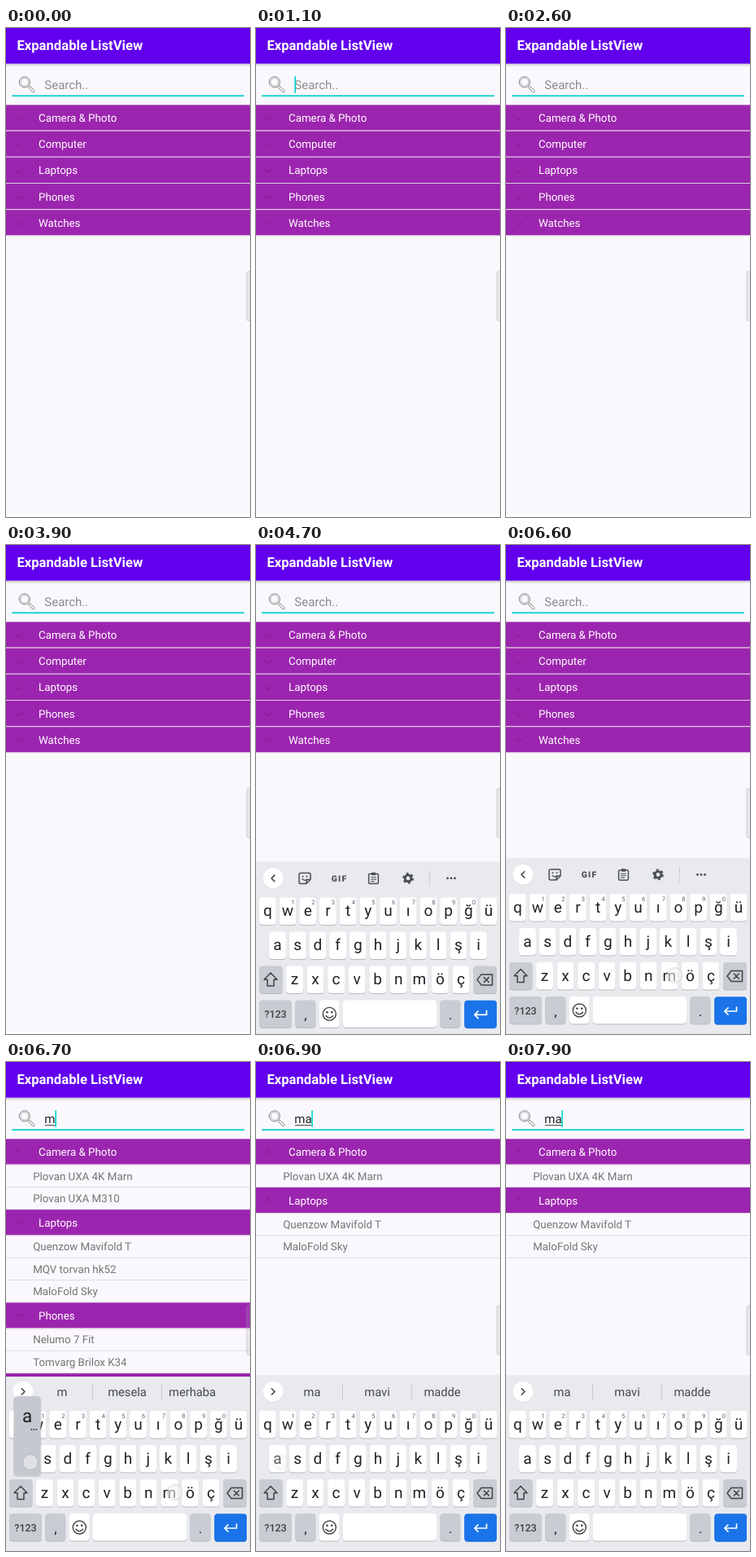
Write an HTML page that moves like this. It is 300 px wide and 600 px high and loops after 8 s.

```html
<!DOCTYPE html>
<html lang="en">
<head>
<meta charset="utf-8">
<title>Expandable list search</title>
<style>
html, body { margin: 0; width: 100%; height: 100%; overflow: hidden; background: #faf8fc; }
svg { display: block; width: 100%; height: 100%; font-family: Roboto, "Noto Sans", sans-serif; }
text { text-rendering: geometricPrecision; }
</style>
</head>
<body>
<svg id="stage" viewBox="0 0 300 600" xmlns="http://www.w3.org/2000/svg">
  <defs>
    <linearGradient id="shade" x2="0" y2="1">
      <stop offset="0" stop-color="#000" stop-opacity=".22"/>
      <stop offset="1" stop-color="#000" stop-opacity="0"/>
    </linearGradient>
  </defs>
</svg>
<script>
const LOOP = 8000, STEP = 100;
const LIST_TOP = 94.4, GROUP_H = 32.2, CHILD_H = 27.3;
const KEYS_TOP = 386, KEYS_H = 214;
const INK = '#202124', ICON = '#4b4e53';

const stage = document.getElementById('stage');

function add(parent, tag, attrs = {}, content) {
  const node = document.createElementNS('http://www.w3.org/2000/svg', tag);
  for (const name in attrs) node.setAttribute(name, attrs[name]);
  if (content !== undefined) node.textContent = content;
  parent.appendChild(node);
  return node;
}
const group = (parent = stage) => add(parent, 'g');
const rect = (p, x, y, width, height, fill, rx = 0) =>
  add(p, 'rect', { x, y, width, height, fill, rx });
const label = (p, x, y, size, fill, text, more = {}) =>
  add(p, 'text', { x, y, 'font-size': size, fill, ...more }, text);
const centred = (p, x, y, size, fill, text, more = {}) =>
  label(p, x, y, size, fill, text, { 'text-anchor': 'middle', ...more });
const line = (p, d, stroke = ICON, width = 1.4) =>
  add(p, 'path', { d, stroke, fill: 'none', 'stroke-width': width,
    'stroke-linecap': 'round', 'stroke-linejoin': 'round' });
const disc = (p, cx, cy, r, fill, more = {}) =>
  add(p, 'circle', { cx, cy, r, fill, ...more });
const ring = (p, cx, cy, r, stroke = ICON, width = 1.4, more = {}) =>
  disc(p, cx, cy, r, 'none', { stroke, 'stroke-width': width, ...more });
const show = (node, on) => node.setAttribute('display', on ? 'inline' : 'none');

// Catalogue
const catalogue = [
  { name: 'Camera & Photo', items: ['Plovan UXA 4K Marn', 'Plovan UXA M310'] },
  { name: 'Computer', items: [] },
  { name: 'Laptops', items: ['Quenzow Mavifold T', 'MQV torvan hk52', 'MaloFold Sky'] },
  { name: 'Phones', items: ['Nelumo 7 Fit', 'Tomvarg Brilox K34'] },
  { name: 'Watches', items: ['Dromvi 3'] }
];

function filterBy(query) {
  if (!query) return catalogue.map(({ name }) => ({ name, items: [] }));
  return catalogue
    .map(({ name, items }) => ({ name, items: items.filter(i => i.toLowerCase().includes(query)) }))
    .filter(({ items }) => items.length);
}

function buildList(query) {
  const g = group();
  let y = LIST_TOP;
  for (const { name, items } of filterBy(query)) {
    rect(g, 0, y, 300, GROUP_H - 1, '#9c25af');
    rect(g, 0, y + GROUP_H - 1, 300, 1, '#dccbe0');
    line(g, items.length ? `M11 ${y + 17.6}l4.5 -4.2l4.5 4.2` : `M11 ${y + 14.6}l4.5 4.2l4.5 -4.2`,
      '#771b89', 1);
    label(g, 40, y + 20.6, 13.33, '#fff', name);
    y += GROUP_H;
    for (const item of items) {
      label(g, 33.2, y + 17.9, 13.33, '#757575', item);
      rect(g, 0, y + CHILD_H - 1, 300, 1, '#dddbdf');
      y += CHILD_H;
    }
  }
  return g;
}

// Page
rect(stage, 0, 0, 300, 600, '#faf8fc');
rect(stage, 0, 597.5, 300, 2.5, '#fff');
rect(stage, 0, 43.5, 300, 4, 'url(#shade)');
rect(stage, 0, 0, 300, 43.7, '#6200ee');
label(stage, 13.4, 27.2, 16.65, '#fff', 'Expandable ListView', { 'font-weight': 700 });

ring(stage, 22.8, 66.3, 6.6, '#777', 0.9);
ring(stage, 22.8, 66.3, 4.9, '#999', 0.7);
line(stage, 'M27.4 72.4l1.4 -1.4l6 5.4q.9 1.2 -.2 2.1q-1 .8 -2 -.1z', '#777', 0.9);
rect(stage, 7.2, 82.3, 285.8, 1.9, '#12d2cf');

const hint = label(stage, 47.3, 75.2, 15, '#8c8b8e', 'Search..');
const typed = label(stage, 47.3, 75.2, 15, '#252427', '');
const underline = rect(stage, 48, 77.2, 1, 1, '#38373a');
const cursor = rect(stage, 47.3, 59.3, 1.7, 20.4, '#08d6cc');

const lists = {};
for (const query of ['', 'm', 'ma']) lists[query] = buildList(query);

add(stage, 'path', { d: 'M301 298.5h-2.6q-2.5 0 -2.5 3v55q0 3 2.5 3h2.6z',
  fill: '#a0a0a8', 'fill-opacity': 0.2, stroke: '#a0a0a8', 'stroke-opacity': 0.45, 'stroke-width': 0.8 });

// Keyboard
const keyboard = group();
rect(keyboard, 0, KEYS_TOP - 2, 300, 3, '#000').setAttribute('opacity', 0.05);
rect(keyboard, 0, KEYS_TOP, 300, KEYS_H + 10, '#e8eaee');

function key(x, y, w, fill = '#fff', edge = '#b6b9bf') {
  rect(keyboard, x, y + 1, w, 33.5, edge, 4);
  rect(keyboard, x, y, w, 33.5, fill, 4);
}
function keyRow(letters, first, pitch, y, hints = '') {
  [...letters].forEach((letter, i) => {
    const x = first + i * pitch;
    key(x - 10.4, y, 20.8);
    centred(keyboard, x, y + 23, 19, INK, letter);
    if (hints && hints[i] !== ' ')
      centred(keyboard, x + 6.6, y + 8.8, 7.6, '#5f6368', hints[i] || '');
  });
}
const GREY_KEY = '#c9ccd2';
keyRow('qwertyuıopğü', 14.3, 24.7, 428, ' 1234567890 ');
keyRow('asdfghjklşi', 26.5, 24.7, 470);
keyRow('zxcvbnmöç', 47.5, 25.55, 512);

key(4, 512, 28.5, GREY_KEY);
line(keyboard, 'M18 520.5l8 8.3h-4v7.7h-8v-7.7h-4z', '#3f4246', 1.5);
key(267, 512, 29, GREY_KEY);
line(keyboard, 'M277 522.5h13.5v13h-13.5l-5 -6.5zM280.3 526l6 6m0 -6l-6 6', '#3f4246', 1.5);

key(4, 554, 40, GREY_KEY);
centred(keyboard, 24, 576, 12.5, '#3c4043', '?123', { 'font-weight': 500 });
key(48.3, 554, 25, GREY_KEY);
centred(keyboard, 61, 578, 17, INK, ',');
key(78, 554, 24.6);
ring(keyboard, 90.3, 571, 8, '#3f4246', 1.4);
disc(keyboard, 87.4, 568.8, 1.3, '#3f4246');
disc(keyboard, 93.2, 568.8, 1.3, '#3f4246');
line(keyboard, 'M86 573.3q4.3 5 8.6 0', '#3f4246', 1.5);
key(107, 554, 115);
key(226.3, 554, 25, GREY_KEY);
centred(keyboard, 239, 578, 17, INK, '.');
key(256.3, 554.3, 39.7, '#1a73e8', '#1a6ad8');
line(keyboard, 'M283.5 567v5h-14.5m4 -4.2l-4.2 4.2l4.2 4.2', '#fff', 1.7);

// Strip above the keys
disc(keyboard, 21, 405.2, 12.5, '#d3d5da');
disc(keyboard, 21, 404.5, 12.5, '#fff');
const divider = (p, x) => rect(p, x, 395, 1, 19, '#c9cbd0');

function buildTools() {
  const g = group(keyboard);
  line(g, 'M22.8 400.7l-3.8 3.8l3.8 3.8', '#3c4043', 1.5);
  line(g, 'M55 398h10q2 0 2 2v6l-5 5h-7q-2 0 -2 -2v-9q0 -2 2 -2zM67 406h-3q-2 0 -2 2v3', ICON, 1.5);
  disc(g, 57.5, 402.3, 1, ICON);
  disc(g, 62.5, 402.3, 1, ICON);
  line(g, 'M57 405.4q3 3 5.5 .3', ICON, 1.3);
  centred(g, 102.6, 408.2, 10.4, ICON, 'GIF', { 'font-weight': 900, 'letter-spacing': 1.2 });
  line(g, 'M140 399h9q1.4 0 1.4 1.4v9.4q0 1.4 -1.4 1.4h-9q-1.4 0 -1.4 -1.4v-9.4q0 -1.4 1.4 -1.4z', ICON, 1.5);
  rect(g, 141.8, 397.3, 5.4, 3.5, ICON, 1);
  line(g, 'M141.5 403.3h6m-6 2.5h6m-6 2.5h4', ICON, 1.1);
  ring(g, 187, 404.5, 3.9, ICON, 2.9);
  ring(g, 187, 404.5, 5.9, ICON, 2, { 'stroke-dasharray': '2.9 3.28' });
  divider(g, 213);
  for (const x of [235.5, 240, 244.5]) disc(g, x, 404.5, 1.4, ICON);
  return g;
}
function buildWords(words) {
  const g = group(keyboard);
  line(g, 'M19.2 400.7l3.8 3.8l-3.8 3.8', '#3c4043', 1.5);
  divider(g, 106);
  divider(g, 191);
  words.forEach((word, i) => centred(g, 69 + 80 * i, 410, 14.7, '#46494e', word));
  return g;
}
const strips = {
  '': buildTools(),
  m: buildWords(['m', 'mesela', 'merhaba']),
  ma: buildWords(['ma', 'mavi', 'madde'])
};

// Pressed key and finger marks
const popup = group();
rect(popup, 9, 411, 34.5, 98, '#000', 5).setAttribute('opacity', 0.12);
rect(popup, 10, 410, 32.5, 97, '#c6c8cf', 4);
centred(popup, 26.2, 441.5, 22.5, INK, 'a');
for (const x of [31.3, 34.3, 37.3]) disc(popup, x, 450.8, 0.9, INK);

const finger = (x, y) => disc(stage, x, y, 9.3, '#f1f1f3',
  { 'fill-opacity': 0.6, stroke: '#9d9fa3', 'stroke-opacity': 0.45, 'stroke-width': 0.9 });
const fingerM = finger(207.5, 528);
const fingerA = finger(30, 491);

const textAt = t => t < 6700 ? '' : t < 6900 ? 'm' : 'ma';
const textEnd = { '': 47.3, m: 60.3, ma: 68.2 };

function cursorOn(t) {
  // Typing restarts the blink; while idle it turns on at 100 ms.
  const start = t >= 6900 ? 6900 : t >= 6700 ? 6700 : 100;
  return t >= start && Math.floor((t - start) / 500) % 2 === 0;
}

function draw(time) {
  const t = Math.floor(time / STEP) * STEP;
  const text = textAt(t);

  show(hint, !text);
  typed.textContent = text;
  underline.setAttribute('width', text ? textEnd[text] - 48 : 0);
  cursor.setAttribute('x', textEnd[text]);
  show(cursor, cursorOn(t));
  for (const query in lists) {
    show(lists[query], query === text);
    show(strips[query], query === text);
  }

  const rise = Math.min(1, Math.max(0, (t - 4400) / 400));
  show(keyboard, rise > 0);
  keyboard.setAttribute('transform', `translate(0 ${KEYS_H * (1 - rise) ** 2.8})`);

  show(popup, t >= 6700 && t < 6900);
  show(fingerM, t >= 6500 && t < 6800);
  show(fingerA, t >= 6700 && t < 7000);
  fingerM.setAttribute('opacity', t < 6600 ? 0.6 : 1);
  fingerA.setAttribute('opacity', t < 6900 ? 1 : 0.5);
}

const begin = performance.now();
function tick() {
  draw((performance.now() - begin) % LOOP);
  requestAnimationFrame(tick);
}
draw(0);
tick();
</script>
</body>
</html>
```
